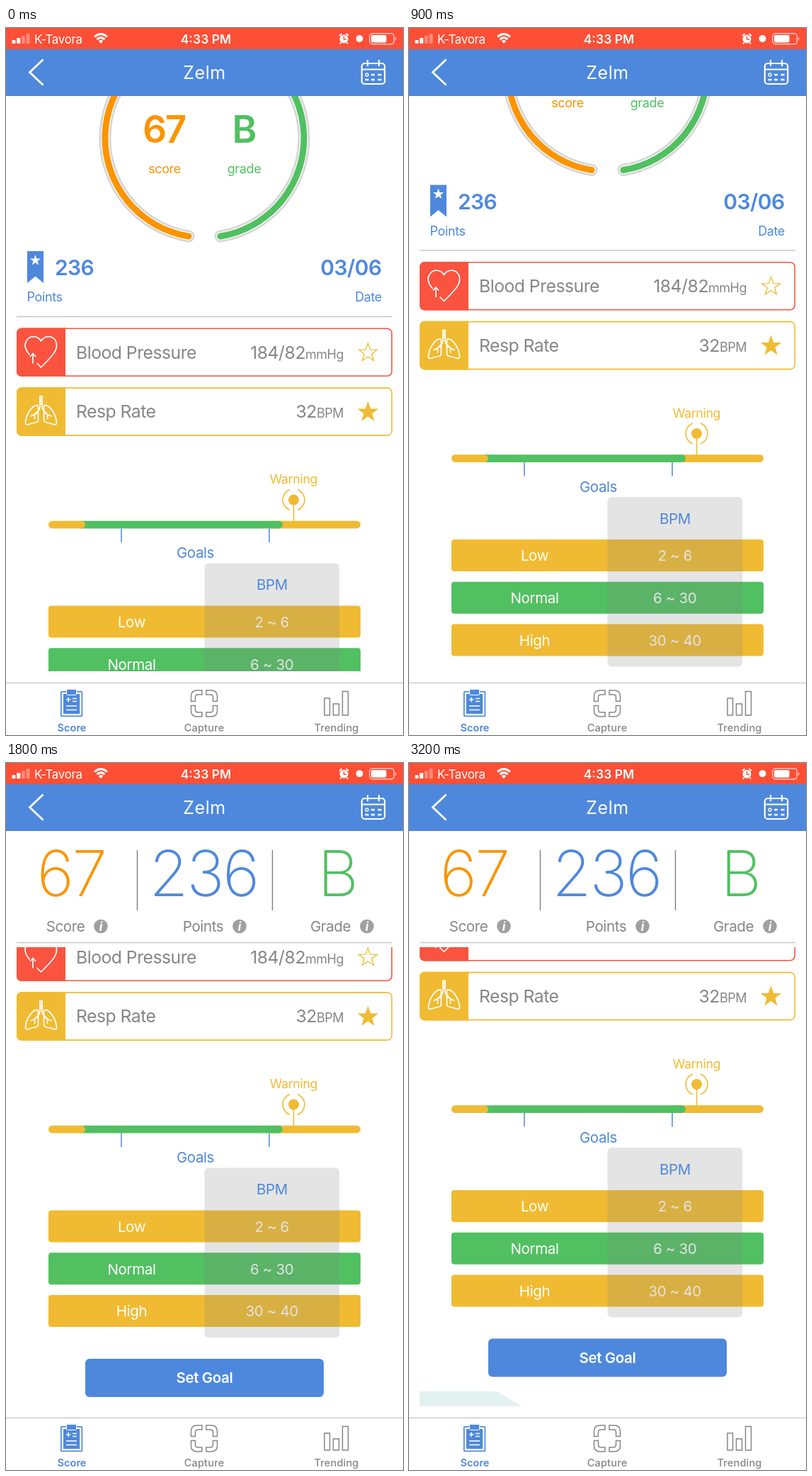
Animation of 561x998 px, one loop 6 s. Source, as an HTML page:

```html
<!DOCTYPE html>
<html lang="en">
<head>
<meta charset="utf-8">
<title>Health score</title>
<style>
  html, body { margin: 0; width: 100%; height: 100%; overflow: hidden; background: #fff; }
  svg { display: block; width: 561px; height: 998px; }
  text { font-family: Inter, Roboto, "Liberation Sans", sans-serif; letter-spacing: -.02em; white-space: pre; }
</style>
</head>
<body>
<svg id="stage" viewBox="0 0 561 998" xmlns="http://www.w3.org/2000/svg"></svg>
<script>
const BLUE = '#4e88dc', RED = '#fa533f', GOLD = '#f0bb32', GREEN = '#51c061',
      ORANGE = '#fb9400', GREY = '#868686', RULE = '#c8c8c8';

// Scroll position at every 100 ms; the last one holds to the end of the loop.
const SCROLL = [0, 5, 13, 22.5, 33, 44.5, 57, 69.5, 81.5, 93.5, 105.5, 117.5, 129.5, 141, 151.8,
                161.5, 170, 177.5, 184, 190, 195, 199, 202.5, 205.5, 208, 210, 211.5, 212.5];
const STEP = 100, LOOP = 6000, PIN_AT = 154;

const text = (x, y, str, size, fill, { anchor = 'middle', weight = 400, ls = -.02, extra = '' } = {}) =>
  `<text x="${x}" y="${y}" font-size="${size}" fill="${fill}" font-weight="${weight}"
    text-anchor="${anchor}" style="letter-spacing:${ls}em" ${extra}>${str}</text>`;
const rect = (x, y, w, h, fill, rx = 0, extra = '') =>
  `<rect x="${x}" y="${y}" width="${w}" height="${h}" rx="${rx}" fill="${fill}" ${extra}/>`;
const circle = (x, y, r, fill, extra = '') => `<circle cx="${x}" cy="${y}" r="${r}" fill="${fill}" ${extra}/>`;
const line = (d, stroke, width, extra = '') =>
  `<path d="${d}" fill="none" stroke="${stroke}" stroke-width="${width}" ${extra}/>`;
const group = (body, attrs) => `<g ${attrs}>${body}</g>`;

function star(x, y, r, attrs) {
  const pts = Array.from({ length: 10 }, (_, i) => {
    const a = i * Math.PI / 5 - Math.PI / 2, q = i % 2 ? r * .4 : r;
    return (x + q * Math.cos(a)).toFixed(2) + ',' + (y + q * Math.sin(a)).toFixed(2);
  });
  return `<polygon points="${pts.join(' ')}" ${attrs}/>`;
}

function statusBar() {
  const bars = [5, 8, 11, 14].map((h, i) =>
    rect(8.5 + i * 6.7, 22 - h, 5, h, '#fff', 1, i > 1 ? 'opacity=".35"' : '')).join('');
  const wifi = line('M125 12.5Q134 4.5 143 12.5M128.5 16Q134 11.2 139.5 16', '#fff', 3) +
    '<path d="M130.8 18.2Q134 15.6 137.2 18.2L134 22Z" fill="#fff"/>';
  const alarm = circle(477.5, 15.5, 6, '#fff') +
    line('M477.5 11.5V16H481', '#fc4f36', 1.4) +
    line('M471 11L474.5 8M484 11L480.5 8M473.5 20.5L472 22.5M481.5 20.5L483 22.5', '#fff', 1.8);
  const battery = rect(513.8, 7.8, 34.5, 15, 'none', 4, 'stroke="#fff" stroke-opacity=".7" stroke-width="1.4"') +
    rect(516, 10, 21.5, 10.6, '#fff', 2) + '<path d="M550 12.5Q553 15.3 550 18Z" fill="#fff" opacity=".7"/>';
  return rect(0, 0, 561, 30, '#fc4f36') + bars + wifi + alarm + battery +
    circle(499.5, 15, 5, '#fff') +
    text(40, 21.5, 'K-Tavora', 17, '#fff', { anchor: 'start' }) +
    text(282.5, 21.5, '4:33 PM', 17.6, '#fff', { weight: 600, ls: 0 });
}

function navBar() {
  const dashes = 'M516 66H521M525.5 66H530.5M507.5 73H512.5M516 73H521M525.5 73H530.5';
  return rect(0, 30, 561, 66, BLUE) +
    line('M52.5 44.5L33.5 62.5L52.5 80.5', '#fff', 2.8) +
    rect(502.8, 50, 32.4, 29, 'none', 4, 'stroke="#fff" stroke-width="2.2"') +
    line('M511 45V54M527 45V54M503 58.5H535', '#fff', 2.2) + line(dashes, '#fff', 2.6) +
    circle(510, 66, 2, 'none', 'stroke="#fff" stroke-width="1.4"') +
    text(280.5, 72, 'Zelm', 25, '#fff', { ls: .02, extra: 'font-family="Lato, sans-serif" style="font-family:Lato,sans-serif"' });
}

function gauge() {
  const left = 'M258 294A140.5 140.5 0 0 1 270 15.2', right = 'M303 294A140.5 140.5 0 0 0 291 15.2';
  const track = (d, color) => [['#d6d6d6', 17], ['#fff', 11.5], [color, 9]]
    .map(([c, w]) => line(d, c, w, 'stroke-linecap="round"')).join('');
  return track(left, ORANGE) + track(right, GREEN) +
    text(223, 162, '67', 53, ORANGE, { weight: 600, ls: -.045 }) +
    text(336.5, 162, 'B', 53, GREEN, { weight: 600 }) +
    text(224, 205, 'score', 18, ORANGE) + text(336.5, 205, 'grade', 18, GREEN);
}

function summary() {
  return `<path d="M30 315H53V360L41.5 350.5L30 360Z" fill="${BLUE}"/>` +
    star(41.5, 328, 8, 'fill="#fff"') +
    text(69, 349, '236', 30, BLUE, { anchor: 'start', weight: 600 }) +
    text(530.5, 349, '03/06', 30, BLUE, { anchor: 'end', weight: 600 }) +
    text(29.5, 386, 'Points', 18, BLUE, { anchor: 'start' }) +
    text(531, 386, 'Date', 18, BLUE, { anchor: 'end' }) +
    line('M15 407.5H546', RULE, 1.3);
}

function card(y, color, label, value, unit, icon, starFill) {
  return rect(15.8, y + .8, 529.4, 67, '#fff', 6.5, `stroke="${color}" stroke-width="1.6"`) +
    `<path d="M84 ${y}H22a7 7 0 0 0-7 7v54.6a7 7 0 0 0 7 7H84Z" fill="${color}"/>` +
    group(icon, `transform="translate(49.5 ${y + 34})" fill="none" stroke="#fff" stroke-width="1.7" stroke-linejoin="round"`) +
    text(99, y + 43, label, 24.8, GREY, { anchor: 'start', ls: -.022 }) +
    text(477, y + 43, `${value}<tspan font-size="18">${unit}</tspan>`, 24.8, GREY, { anchor: 'end' }) +
    star(511.5, y + 35, 13.6, `fill="${starFill}" stroke="${GOLD}" stroke-width="1.3"`);
}

const heart = '<path d="M-16 4C-22-3-24-10-21-15C-17-24-5-24 0-15.500C5-24 17-24 21-15C26-3 14 7 0 21.500L-6 15.500M-11.500 16V2M-15.500 6.500L-11.500 2L-7.500 6.500"/>';
const lung = '<path d="M-5-9C-13-9-21 4-22 15C-22.500 20-18 19-14 17C-9 15-4 17-4 11V-4Q-4-9-5-9M-1.500-4L-9 4M-9 4L-15 7M-9 4V11M-4 1L-9 4"/>';
const lungs = lung + group(lung, 'transform="scale(-1 1)"') +
  '<path d="M-1.500-22V-6L-4-2M1.500-22V-6L4-2"/><path d="M0-22V-9" stroke-width="4" stroke-dasharray="2 1.300"/>';

function range() {
  return text(406.5, 643, 'Warning', 17.8, GOLD) +
    circle(406.5, 666, 7.5, GOLD) +
    line('M401 651.500A15.500 15.500 0 0 0 401 680.500M412 651.500A15.500 15.500 0 0 1 412 680.500M406.500 672V697', GOLD, 1.6) +
    rect(370, 695.8, 131, 10.6, GOLD, 5.3) +
    rect(100, 695.8, 291, 10.6, GREEN, 5.3) +
    rect(60, 695.8, 52, 10.6, GOLD, 5.3) +
    line('M163 706.500V726M372 706.500V726', BLUE, 1.5) +
    text(267.5, 748, 'Goals', 20.5, BLUE);
}

function levels() {
  const rows = [['Low', '2 ~ 6', GOLD], ['Normal', '6 ~ 30', GREEN], ['High', '30 ~ 40', GOLD]];
  return rows.map(([name, span, color], i) => {
    const y = 815.5 + i * 59.8;
    return rect(60, y, 441, 45, color, 4) + text(177.5, y + 30.2, name, 20.6, '#fff') +
      text(375.7, y + 30.2, span, 20.6, '#fff');
  }).join('') +
    rect(280.5, 755.5, 190.7, 239.5, 'rgb(126,130,130)', 6, 'opacity=".21"') +
    text(376, 793, 'BPM', 20.5, BLUE);
}

function page() {
  return gauge() + summary() +
    card(423.5, RED, 'Blood Pressure', '184/82', 'mmHg', heart, 'none') +
    card(507.3, GOLD, 'Resp Rate', '32', 'BPM', lungs, GOLD) +
    range() + levels() +
    rect(112, 1025, 337, 54, BLUE, 6) +
    text(280.5, 1059, 'Set Goal', 20.5, '#fff', { weight: 600 }) +
    '<path d="M15 1099.500H124L168 1126H15Z" fill="#e1f1ef"/>';
}

function pinned() {
  const stat = (mid, value, color, lx, label, ix) =>
    text(mid, 188, value, 90, color, { weight: 250, ls: -.03 }) +
    text(lx, 238, label, 20.6, GREY) + circle(ix, 230.5, 9.8, '#a0a0a0') +
    text(ix, 236.5, 'i', 17, '#fff', { weight: 700, ls: 0, extra: 'style="font-family:\'Noto Serif\',serif" font-style="italic"' });
  return rect(0, 96, 561, 164, '#fff') +
    stat(92, '67', ORANGE, 84, 'Score', 134) +
    stat(279, '236', BLUE, 278.5, 'Points', 330) +
    stat(468, 'B', GREEN, 458.5, 'Grade', 510) +
    line('M185.500 123V208M376.500 123V208', '#777', 1.3) +
    line('M15 253.500H546', RULE, 1.3);
}

function tabBar() {
  const clipboard = rect(77.8, 936.8, 29.6, 34.6, '#fff', 1, `stroke="${BLUE}" stroke-width="1.7"`) +
    rect(81, 940, 23.2, 28.2, BLUE) + rect(85.5, 933.5, 14, 8, BLUE, 1, 'stroke="#fff" stroke-width="1"') +
    line('M85 948H91.500M88.200 944.800V951.200M94 946.500H100M94 950.500H100M85 957H100M85 962.500H100', '#fff', 1.6);
  const corner = '<path d="M-3-18.500H-10Q-18.500-18.500-18.500-10V-3H-12.500V-9Q-12.500-12.500-9-12.500H-3Z"/>';
  const frame = ['1 1', '-1 1', '1 -1', '-1 -1'].map(s => group(corner, `transform="scale(${s})"`)).join('');
  const bars = [[450, 946, 7.5], [462.5, 954, 8], [475.5, 936.5, 8]].map(([x, y, w]) =>
    rect(x, y, w, 970 - y, 'none', 0, `stroke="${GREY}" stroke-width="1.5"`)).join('');
  return rect(0, 908, 561, 90, '#fff') + line('M0 924.500H561', '#bcbcbc', 1.2) +
    clipboard + group(frame, `transform="translate(280 953.500)" fill="none" stroke="${GREY}" stroke-width="1.5"`) + bars +
    text(93, 993, 'Score', 14.6, BLUE, { weight: 600, ls: 0 }) +
    text(280, 993, 'Capture', 14.6, GREY, { weight: 500, ls: .01 }) +
    text(467, 993, 'Trending', 14.6, GREY, { weight: 500, ls: .01 });
}

document.getElementById('stage').innerHTML =
  rect(0, 0, 561, 998, '#fff') + group(page(), 'id="page"') + group(pinned(), 'id="pinned"') +
  tabBar() + navBar() + statusBar();

const pageEl = document.getElementById('page'), pinnedEl = document.getElementById('pinned');

function draw() {
  const step = Math.floor(performance.now() % LOOP / STEP);
  const y = SCROLL[Math.min(step, SCROLL.length - 1)];
  pageEl.setAttribute('transform', `translate(0 ${-y})`);
  pinnedEl.setAttribute('visibility', y >= PIN_AT ? 'visible' : 'hidden');
  requestAnimationFrame(draw);
}
draw();
</script>
</body>
</html>
```
